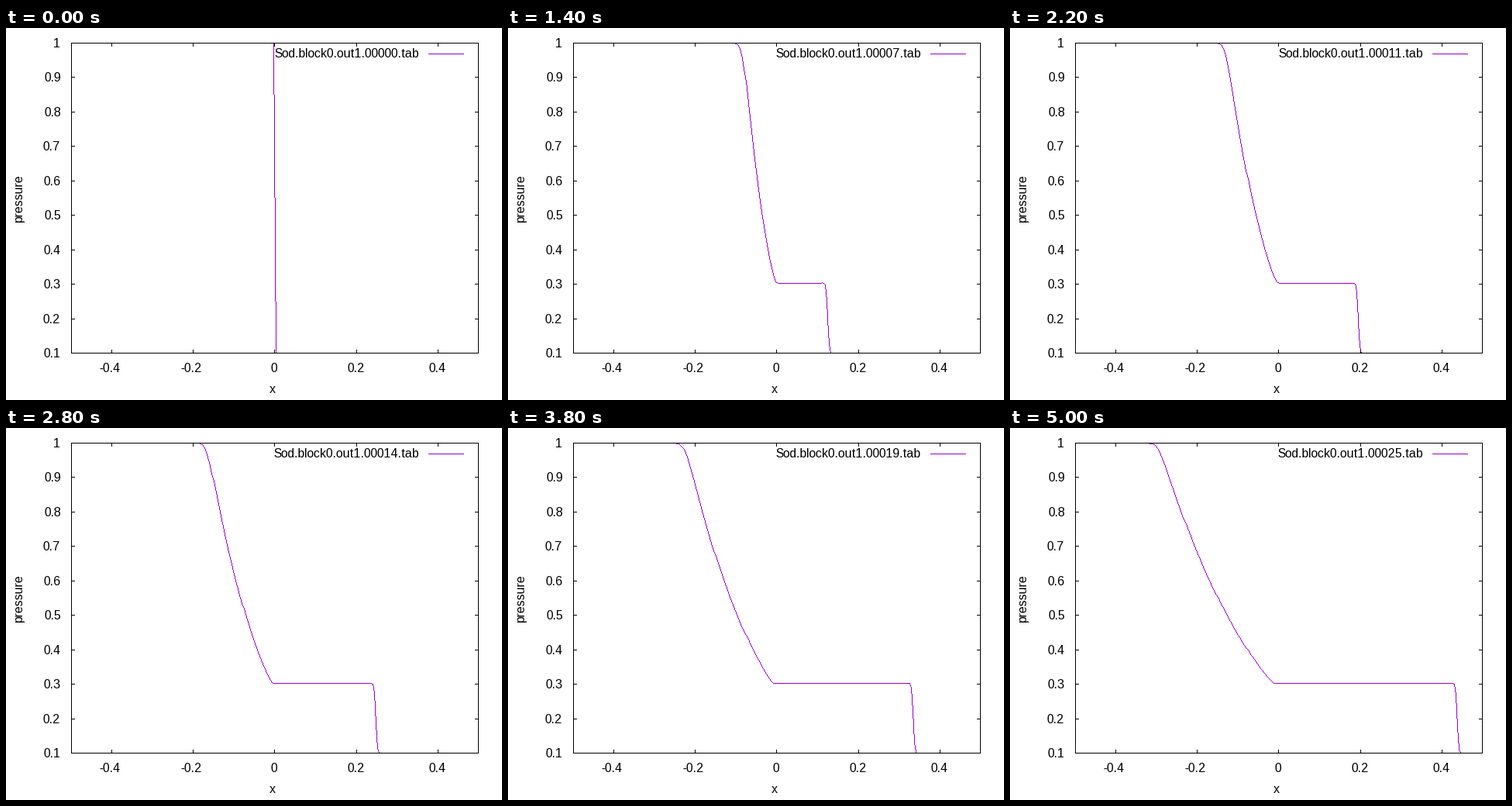
Recreate the animation shown at these times as a matplotlib script. Size 640 by 480 pixels, loop 5200 ms.

```python
import numpy as np
import matplotlib.pyplot as plt
from matplotlib.animation import FuncAnimation

W, H, DPI = 640, 480, 100
FRAMES, INTERVAL = 26, 200
LEFT, RIGHT, TOP, BOTTOM = 84, 609, 19, 419
BLACK, PURPLE = (0, 0, 0, 255), (148, 0, 211, 255)

# --- shock tube solver: finite volume, two-stage van Leer scheme ---
N, GAMMA, CFL = 256, 1.4, 0.8
DX = 1 / N
X = (np.arange(N) + 0.5) * DX - 0.5


def to_cons(w):
    r, u, p = w
    return np.array([r, r * u, p / (GAMMA - 1) + 0.5 * r * u * u])


def to_prim(q):
    r, m, e = q
    return np.array([r, m / r, (GAMMA - 1) * (e - 0.5 * m * m / r)])


def sound(w):
    return np.sqrt(GAMMA * w[2] / w[0])


def hllc(wl, wr):
    (rl, ul, pl), (rr, ur, pr) = wl, wr
    cl, cr = sound(wl), sound(wr)
    pm = 0.5 * (pl + pr + (ul - ur) * 0.25 * (rl + rr) * (cl + cr))
    k = (GAMMA + 1) / (2 * GAMMA)
    al = ul - cl * np.sqrt(1 + k * np.maximum(pm / pl - 1, 0))
    ar = ur + cr * np.sqrt(1 + k * np.maximum(pm / pr - 1, 0))
    ml, mr = rl * (ul - al), rr * (ar - ur)
    tl, tr = pl + ml * ul, pr - mr * ur
    am = (tl - tr) / (ml + mr)
    cp = np.maximum((ml * tr + mr * tl) / (ml + mr), 0)
    # the upwind side of the contact decides the flux
    left = am >= 0
    b = np.where(left, np.minimum(al, 0), np.maximum(ar, 0))
    w = np.where(left, wl, wr)
    flux = to_cons(w) * (w[1] - b)
    flux[1] += w[2]
    flux[2] += w[2] * w[1]
    flux *= am / (am - b)
    star = -b / (am - b) * cp
    flux[1] += star
    flux[2] += star * am
    return flux


def padded(w, n):
    return np.pad(w, ((0, 0), (n, n)), mode="edge")


def donor_faces(w):
    g = padded(w, 1)
    return g[:, :-1], g[:, 1:]


def linear_faces(w):
    g = padded(w, 2)
    d = np.diff(g)
    a, b = d[:, :-1], d[:, 1:]
    same = a * b > 0
    half = np.where(same, a * b / np.where(same, a + b, 1), 0)
    c = g[:, 1:-1]
    return (c + half)[:, :-1], (c - half)[:, 1:]


def advance(q, dt):
    mid = q - 0.5 * dt / DX * np.diff(hllc(*donor_faces(to_prim(q))))
    return q - dt / DX * np.diff(hllc(*linear_faces(to_prim(mid))))


def pressure_history(end=0.25, every=0.01):
    w = np.array([np.where(X < 0, 1, 0.125), 0 * X, np.where(X < 0, 1, 0.1)])
    q, t, due = to_cons(w), 0.0, every
    out = [w[2]]
    while t < end and len(out) < FRAMES:
        dt = CFL * DX / np.max(np.abs(w[1]) + sound(w))
        dt = min(dt, end - t)
        q = advance(q, dt)
        w = to_prim(q)
        t += dt
        if t >= due or t >= end:
            out.append(w[2])
            due += every
    while len(out) < FRAMES:
        out.append(w[2])
    return out


history = pressure_history()


# --- one-pixel line work ---
def trace(img, cols, rows):
    for x0, y0, x1, y1 in zip(cols[:-1], rows[:-1], cols[1:], rows[1:]):
        n = max(abs(x1 - x0), abs(y1 - y0), 1)
        k = np.arange(n + 1) / n
        px = np.floor(x0 + (x1 - x0) * k + 0.5).astype(int)
        py = np.floor(y0 + (y1 - y0) * k + 0.5).astype(int)
        img[py, px] = PURPLE


COLS = np.floor(LEFT + (RIGHT - LEFT) * (X + 0.5) + 0.5).astype(int)
X_TICKS = {136: "-0.4", 241: "-0.2", 346: "0", 452: "0.2", 557: "0.4"}
Y_TICKS = [int(BOTTOM - np.floor(400 * i / 9 + 0.5)) for i in range(10)]


def draw_border(img):
    img[[TOP, BOTTOM], LEFT:RIGHT + 1] = BLACK
    img[TOP:BOTTOM + 1, [LEFT, RIGHT]] = BLACK
    for x in X_TICKS:
        img[TOP:TOP + 5, x] = BLACK
        img[BOTTOM - 4:BOTTOM + 1, x] = BLACK
    for y in Y_TICKS:
        img[y, LEFT:LEFT + 5] = BLACK
        img[y, RIGHT - 4:RIGHT + 1] = BLACK


def render(i):
    p = np.clip(history[i], 0.1, 1)
    rows = BOTTOM - np.floor((BOTTOM - TOP) * (p - 0.1) / 0.9 + 0.5).astype(int)
    img = np.zeros((H, W, 4), np.uint8)
    trace(img, COLS, rows)
    img[33, 545:591] = PURPLE
    draw_border(img)
    return img


# --- stage ---
plt.rcParams["font.family"] = "Liberation Sans"
plt.rcParams["text.hinting_factor"] = 2
fig = plt.figure(figsize=(W / DPI, H / DPI), dpi=DPI, facecolor="white")
ax = fig.add_axes([0, 0, 1, 1])
ax.axis("off")
lines = ax.imshow(render(0), interpolation="nearest", aspect="auto", zorder=5,
                  extent=(-0.5, W - 0.5, H - 0.5, -0.5))


def label(x, y, s, ha="center", **kw):
    return ax.text(x, y, s, ha=ha, va="baseline", color="black",
                   fontsize=16 * 72 / DPI, **kw)


for x, s in X_TICKS.items():
    label(x - 2.5 if s[0] == "-" else x - 1, 443, s)
for i, y in enumerate(Y_TICKS):
    label(70, y + 5.5, f"{(i + 1) / 10:g}", ha="right")
label(343, 470.5, "x")
label(20.5, 219.5, "pressure", rotation=90, rotation_mode="anchor")
title = label(532.5, 38, "", ha="right")


def update(i):
    lines.set_data(render(i))
    title.set_text(f"Sod.block0.out1.{i:05d}.tab")
    return lines, title


anim = FuncAnimation(fig, update, frames=FRAMES, interval=INTERVAL,
                     repeat=True, repeat_delay=0, blit=False)
plt.show()
```
